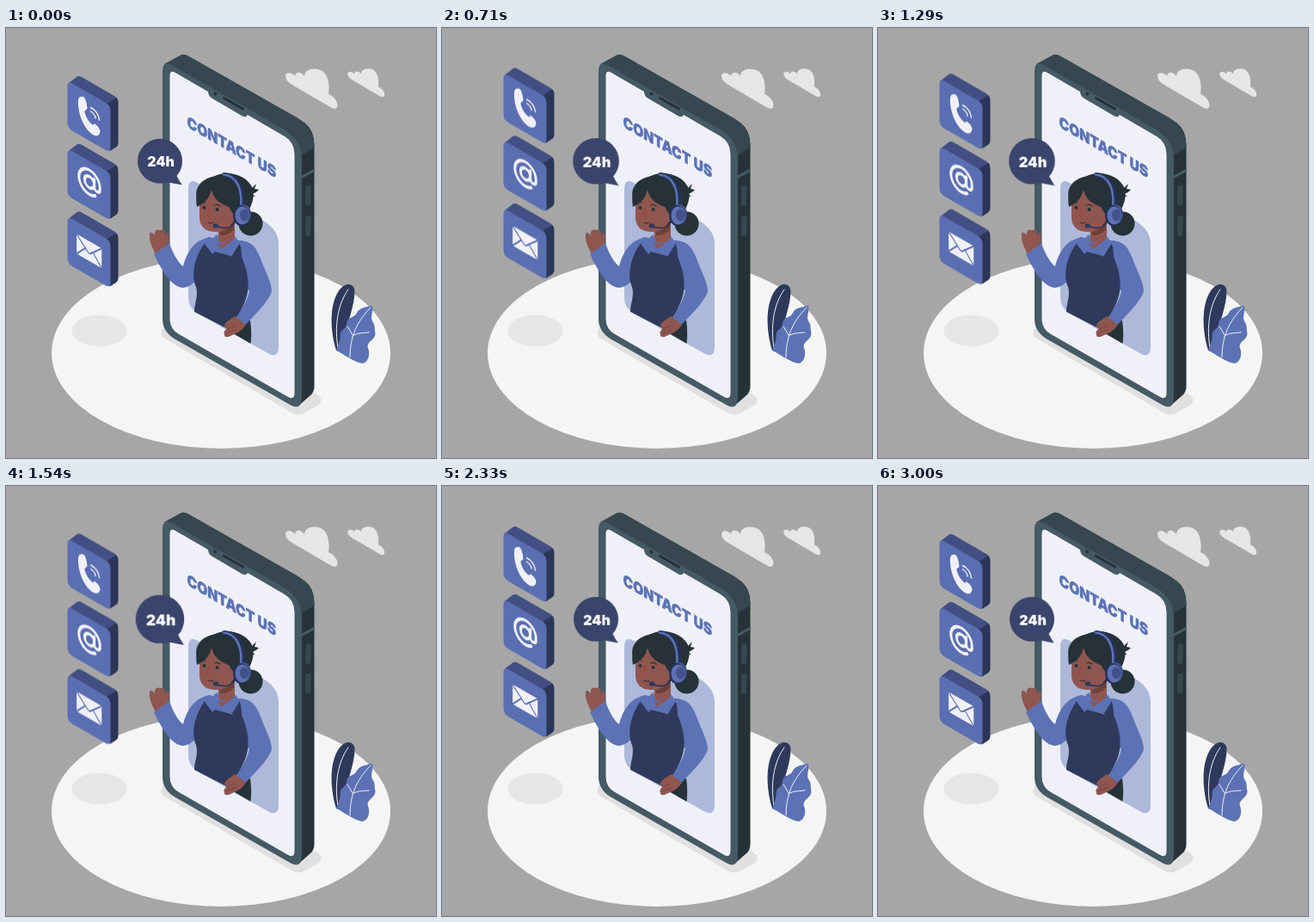
Recreate the animation shown at these times as an HTML page. Size 500 by 500 pixels, loop 3040 ms.

```html
<!DOCTYPE html>
<html lang="en">
<head>
<meta charset="utf-8">
<title>Contact us</title>
<style>
  html, body { margin: 0; width: 100%; height: 100%; overflow: hidden; background: #a6a6a6; }
  svg { display: block; width: 100vw; height: 100vh; }
  text { font-family: Inter, "Open Sans", sans-serif; font-weight: 900; }
  .blue { fill: #5c72b5; }
  .navy { fill: #2e395b; }
  .ink { fill: #263238; }
  .skin { fill: #8f5650; }
  .line { fill: none; stroke-linecap: round; stroke-linejoin: round; }

  /* 3 s of motion, then a short hold before the loop restarts */
  .float { animation: float 3040ms linear infinite; }
  .beat { transform-origin: 179px 155.3px; animation: beat 3040ms linear infinite; }
  @keyframes float {
    0%, 49.342%, 98.684%, 100% { transform: translateY(0); }
    24.671%, 74.013% { transform: translateY(-10px); }
  }
  @keyframes beat {
    0%, 29.605%, 39.474%, 59.211%, 100% { transform: scale(1); }
    9.868%, 49.342% { transform: scale(1.1); }
  }
</style>
</head>
<body>
<svg viewBox="0 0 500 500">
  <defs>
    <g id="tile">
      <path fill="#424f82" d="M73 64L82 57Q84.500 55 88 57L126 79Q130 81.500 130 86L121 93Z"/>
      <path fill="#2b3658" d="M117 88L128.500 81Q130.500 83 130.500 87V134Q130.500 137 128 138.500L121 143L117 140Z"/>
      <path fill="#5a6eb2" d="M71.500 68Q71.500 61.500 77 64.500L116 87Q121.500 90 121.500 96.500V139Q121.500 145 116 142L77 119.500Q71.500 116 71.500 110Z"/>
    </g>
    <path id="cloud" d="M325 56C325 51 332 51 336 56C336 51 343 50 347 56C347 48 358 45 367 49.500C374 53 377 66 375 77C381 79 386 86 385.500 90C385 95 381 94 377 92L331 65C327 62 325 59 325 56Z"/>
  </defs>

  <!-- scenery -->
  <ellipse cx="250" cy="378" rx="197" ry="111" fill="#f5f5f5"/>
  <ellipse cx="108.500" cy="352" rx="32" ry="18.300" fill="#e6e6e6"/>
  <path fill="#e0e0e0" d="M184 347Q176 356 186 362L330 446Q340 453 350 446L364 438Q370 432 362 426L300 390Z"/>
  <g fill="#e6e6e6">
    <use href="#cloud"/>
    <use href="#cloud" transform="translate(166.500 13.700) scale(.71)"/>
  </g>

  <!-- plant -->
  <path class="navy" d="M384 375C376 349 376 316 390 302C397 295 405 298 405.500 306C405 324 398 338 396 352L390 376Z"/>
  <path class="line" stroke="#f0f1f8" d="M386 372C382 348 385 322 398 304"/>
  <path class="blue" d="M384 375C386 369 389 364 388.500 358C388 350 396 351 396 343C397 335 405 338 408 331C412 324 420 325 425 322.500C429 326 423 335 426 341C430 346 428 350 429.500 355C429 363 420 364 420.500 371C424 378 422 388 415 390C407 390 396 381 384 375Z"/>
  <path class="line" stroke="#f0f1f8" d="M400 383C400 360 407 342 424 325M403 357L397 347M403 358C409 354 415 355 422 354"/>

  <!-- phone -->
  <path class="ink" d="M330 110L347 110Q358.500 119 358.500 136V416Q358.500 424 353 428L341 438.500L325 430Z"/>
  <path fill="#37474f" d="M184 42L203 31.500Q207 29.500 213 33L339 104.500Q358.500 116 358.500 139L344 148L320 122Z"/>
  <path fill="#455a64" d="M344 171.500L358.500 163.500V167L344 175Z"/>
  <g fill="#37474f">
    <rect x="348" y="183" width="6.500" height="24" rx="3.200" transform="rotate(2 351 195)"/>
    <rect x="348" y="218" width="6.500" height="24" rx="3.200" transform="rotate(2 351 230)"/>
  </g>
  <path fill="#455a64" d="M182 50Q182 37 194 44L324 118.500Q344 131 344 152V429Q344 445 331 438.500L196 361.500Q182 353 182 338Z"/>
  <path fill="#f0f1f8" d="M190.500 56Q190.500 48 197 52L235 74Q235 79 240 82L275 102.500Q279 104.500 281 101L324 126Q335.500 133 335.500 147V424Q335.500 433 328 429L201 356Q190.500 350 190.500 338Z"/>
  <path class="line" stroke="#263238" stroke-width="3" d="M253.500 81.500L275.500 94"/>
  <circle cx="243.500" cy="76.500" r="2" fill="#263238"/>

  <text transform="matrix(.866 .5 0 1 210.500 115)" font-size="18" fill="#5c72b5" stroke="#5c72b5" stroke-width=".4">CONTACT US</text>
  <path fill="#adb8da" d="M212 187Q212 174 223 180L299 224Q317 235 317 251V371Q317 384 306 379L223 332Q212 325 212 314Z"/>

  <!-- agent -->
  <path class="ink" d="M266 343L284 340Q286 354 284.500 367L256 350.500Z"/>
  <g class="skin">
    <path d="M174 263C171 257 166 248 167 240C168 236 171 238 173 242C172 236 175 233 179 235C183 233 185 237 186 242C187 236 190 238 189.500 243L189 253Z"/>
    <path d="M247 226L266 224L266 248Q258 262 246 264Z"/>
  </g>
  <path class="blue" d="M172 263L190 250C194 262 200 273 206 277C209 264 216 253 224 248Q229 245 236 243L247 246L262 266L266 247C283 246 290 252 296 268C301 282 309 296 309 306C305 320 286 336 277 347L267 338C275 325 282 315 283 305L240 300L228 279C223 292 217 301 206 302C193 302 181 282 172 263Z"/>
  <path class="navy" d="M231 250L242 260L262 265L271 249Q274 256 274 266C280 281 283 293 281 306C280 314 276 325 267 338L258 350L219 330C219 320 224 312 221 301C216 290 217 270 231 250Z"/>
  <path class="blue" d="M245 240L239 246Q231 249 231 251L240 263L247 255L262 266L272 250L266 242L250 251Z"/>
  <path class="skin" d="M246 250L252 252L266 238L265 246L250 257Z"/>
  <path class="skin" d="M266 335L279 345Q276 350 270 354L259 359Q253 360 254 356Q252 354 256 350Q255 346 260 344L264 343L254 348Q253 344 259 340Z"/>
  <path class="line" stroke="#6f403b" stroke-width=".8" d="M257 350L266 346M256 355L267 351"/>

  <circle class="ink" cx="284.500" cy="227.500" r="14"/>
  <path class="ink" d="M281 191L291 181L289 187L294 188Q291 192 285 193L290 196L280 196Z"/>
  <path class="ink" d="M222 198C219 188 225 176 241 173C257 164 281 171 287 187C290 202 282 213 276 222L260 230L240 186Z"/>
  <path class="skin" d="M225 199C228 192 233 187 239 184L262 195L266 222C261 232 252 237 244 237C232 237 226 231 225 222Z"/>
  <path class="ink" d="M222 208C219 190 226 177 240 173C257 167 274 174 273 193L266 218Q262 214 259 208C249 205 241 198 239 188Q236 202 222 208Z"/>
  <path fill="#6f403b" d="M249 237Q260 234 265 225L265 234Q259 242 249 241Z"/>
  <g class="line" stroke="#263238">
    <path stroke-width="1.300" d="M228 203.500Q230 202 232 203M243 206Q246 204.500 249 207"/>
    <path stroke="#a8403f" stroke-width="1.200" d="M237 209L234 217Q235 220 238 219"/>
    <path stroke="#4a2522" stroke-width="1.200" d="M235 226Q238 228 241 226"/>
  </g>
  <circle class="ink" cx="230.500" cy="209" r="2"/>
  <circle class="ink" cx="245.500" cy="211" r="2"/>

  <!-- headset -->
  <g class="line">
    <path stroke="#263156" stroke-width="6" d="M254 171C270 172 277 188 275 208"/>
    <path stroke="#5c72b5" stroke-width="2.600" d="M253 170.500C269 172 275 188 273 208"/>
  </g>
  <ellipse cx="276" cy="216.500" rx="9" ry="11.500" fill="#43518a"/>
  <ellipse cx="273" cy="218" rx="9" ry="12" fill="#263156"/>
  <ellipse class="blue" cx="274.500" cy="218" rx="8" ry="10.500"/>
  <ellipse cx="277" cy="217.500" rx="5" ry="7" fill="#43518a"/>
  <path class="line" stroke="#263156" stroke-width="1.400" d="M266 225Q262 236 246 231"/>
  <ellipse class="navy" cx="244" cy="230" rx="3.200" ry="2.800"/>

  <!-- speech bubble -->
  <g class="beat" fill="#3a446c">
    <path d="M202 165L198 171Q201 177 204.700 182.500L186 179Z"/>
    <circle cx="179" cy="154.800" r="26"/>
    <text x="180" y="161.300" font-size="16" text-anchor="middle" fill="#fff">24h</text>
  </g>

  <!-- contact tiles -->
  <g class="float">
    <use href="#tile"/>
    <path fill="#f0f1f8" d="M84 84C84 80 87 79 90 80C93 82 94 89 94.500 93C94 96 91 95 91.500 98C93 104 96 109 101 113C102 112 102 111 104 112C107 114 109 117 109.500 120C109 125 106 126 103 125C92 120 83 101 84 84Z"/>
    <path class="line" stroke="#f0f1f8" stroke-width="1.400" d="M98.500 92.500C104 95 108 101 108.500 107M98.500 97C101 98.500 104 102 104 105"/>
    <use href="#tile" y="78.800"/>
    <path class="line" stroke="#f0f1f8" stroke-width="3.200" transform="matrix(.97 .56 0 1.120 97 179.300)"
          d="M7 10.500A12.600 12.600 0 1 1 12.600 0V2A3.400 3.400 0 0 1 5.800 2V-6M5.800 0A5.800 5.800 0 1 1 5.800-.1"/>
    <use href="#tile" y="157.600"/>
    <g transform="matrix(.866 .5 0 1 96.700 259.400)">
      <rect x="-16.800" y="-11.500" width="33.600" height="23" rx="1" fill="#f0f1f8"/>
      <path class="line" stroke="#5a6eb2" stroke-width="1.500" d="M-16.500-11L-1.500 2.200Q0 3.400 1.500 2.200L16.500-11M-16.500 11L-5-1M16.500 11L5-1"/>
    </g>
  </g>
</svg>
</body>
</html>
```
